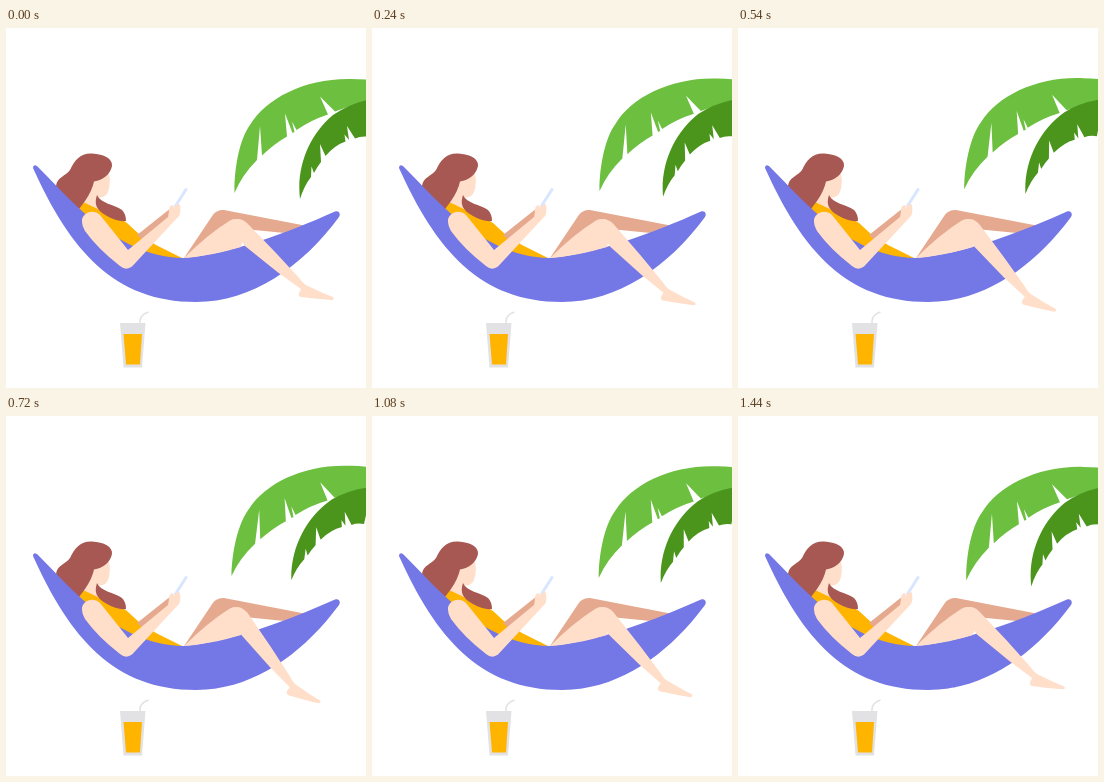
An HTML page that plays this animation: 360x360 px, repeating every 1.5 s.

```html
<!DOCTYPE html>
<html lang="en">
<head>
<meta charset="utf-8">
<title>Hammock</title>
<style>
html, body { margin: 0; height: 100%; overflow: hidden; background: #fff; }
svg { display: block; width: 100vw; height: 100vh; }
.skin { fill: #ffdeca; }
.shade { fill: #e5a98f; }
.hair { fill: #a85852; }
.amber { fill: #ffb400; }
.grey { fill: #e2e2e4; }
</style>
</head>
<body>
<svg viewBox="0 0 360 360">
  <!-- palm leaves -->
  <path id="leaf" fill="#6dbf40" d="M228.5 165C228 142 233 112 244 97C260 70 300 50 345 51Q375 51 400 58L380 70Q352 74 329 83.500L314 68.500L322 86.500Q305 92 290.500 102L286 93.500L288.500 104L286.500 105L279 85.500L281 108.500Q268 116 256 127.500L254 98L251 132Q236 147 228.500 165Z"/>
  <path id="frond" fill="#4b951c" d="M294 171C290 138 304 106 327 87Q343 75.500 365 71L385 70L380 90L363 96L361.300 108.500Q354 108 349 110.500L341 98L343 112L338.500 106.500L339.500 113.500Q329 117 319.500 128L314 116L315 134Q311 139 308 145L305.500 138.500L305 149Q298 158 294 171Z"/>

  <!-- far leg, dress and far arm -->
  <path class="shade" d="M178 230L206.500 187.500Q210.500 181.500 218 182L301 198L294 206.500L228 200L184 229Z"/>
  <path class="amber" d="M70 180L78 173Q91 180 108 187L121 195L134 207L150 217L178 231L130 236L90 212Z"/>
  <path class="shade" d="M131 207L165 180L168 186L139 214Z"/>

  <!-- head -->
  <path class="skin" d="M88 148L103 146Q105 155 102 164Q99 171 91 169L90 174Q91 178 94 182L77 174Z"/>
  <path class="hair" d="M73 181C63 173 52 165 50 158C51 149 60 148 64 142C69 132 74 125 86 125.500C98 126 107 131 106 138C104 147 97 152 88 153.500Q86 163 79 173Z"/>
  <path class="hair" d="M91 167C95 176 108 176 116 182Q120 186 120 193Q111 194 101 188C90 182 88 176 91 167Z"/>

  <path fill="#7477e6" d="M27 140Q27 136 31 138C47 154 66 175 84 190C108 210 140 230 178 230C224 226 280 205.500 329 183.500C333 182 335 186 333 189C296 239 246 274 190 274C108 274 64 222 27 140Z"/>

  <!-- near leg -->
  <path class="skin" d="M178 230Q202 206 224 192.500Q229 190 235 192L240 197L235 219Q205 228 178 230Z"/>
  <path id="shin" class="skin" d="M223 195Q232 187 241 195L270 225L294 251Q298 257 304 259Q316 265 327 269Q329 271 326 272Q311 271 295 269Q292 268 293 265L295 261L272 244.500L239 218Z"/>

  <!-- phone and near arm -->
  <path d="M169.500 178L180 161.500" fill="none" stroke="#d8e6ff" stroke-width="3" stroke-linecap="round"/>
  <path class="skin" d="M76 194C75 185 87 180 94 187Q107 203 122 222L162 189Q163 185 163 181Q164 177 167 177L168 180Q172 174 174 177Q175 185 173 188L165 196.500L126 238.500Q120 243 114 238Q92 221 79 203Q76 198 76 194Z"/>

  <!-- drink -->
  <path d="M134 297V293Q134 287 142.500 284" fill="none" stroke="#e2e2e4" stroke-width="1.5"/>
  <path class="grey" d="M114 295H139.500L136 339.500H117.500Z"/>
  <path class="amber" d="M117.500 306H136L134 336.500H120Z"/>
</svg>
<script>
const LOOP = 1500, STEP = 60;
// id, degrees of swing, pivot x, pivot y
const swings = [["leaf", 1.9, 380, 72], ["frond", 5.2, 365, 72], ["shin", 9.7, 229, 200]];

function draw(now) {
  const t = Math.floor(now % LOOP / STEP) * STEP;
  const amount = Math.min(t, LOOP - t) / 720;
  for (const [id, angle, x, y] of swings) {
    document.getElementById(id).setAttribute("transform", `rotate(${angle * amount} ${x} ${y})`);
  }
  requestAnimationFrame(draw);
}
draw(performance.now());
</script>
</body>
</html>
```
